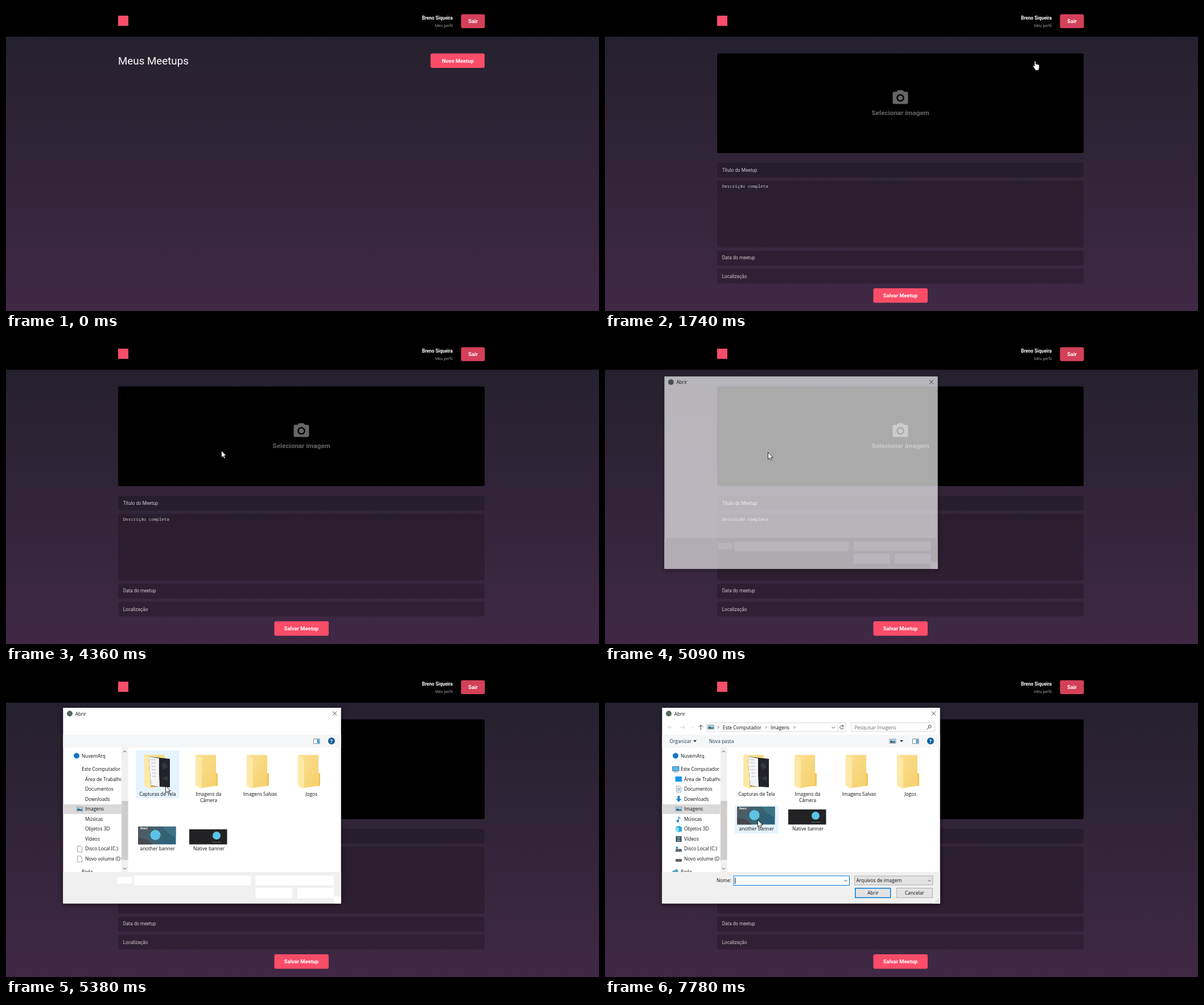
Write an HTML page that moves like this. It is 1042 by 537 pixels and loops after 8000 ms.

```html
<!DOCTYPE html>
<html lang="pt-BR">
<head>
<meta charset="utf-8">
<title>Meus Meetups</title>
<style>
html, body { margin: 0; width: 100%; height: 100%; overflow: hidden; background: #22202c; }
svg { display: block; width: 100vw; height: 100vh; }
text { font-family: Roboto, sans-serif; fill: #fff; white-space: pre; }
.b { font-weight: 700; font-size: 9.35px; }
.mid { text-anchor: middle; }
.end { text-anchor: end; }
.ph text { font-size: 8.2px; fill: #cbc6cc; }
.ph .mono { font: 7.52px "Noto Sans Mono", monospace; }
#dialog text { font-family: "Open Sans", sans-serif; font-size: 8.35px; fill: #111; }
#dialog .nav { fill: #1e395b; }
#dialog .hint { fill: #6d6d6d; }
#dialog .tiny { fill: #fff; font-size: 4.6px; font-weight: 700; }
.line { fill: none; stroke: #444; stroke-width: 1; }
.pale { stroke: #d0d0d0; }
.white { fill: #fff; }
</style>
</head>
<body>
<svg viewBox="0 0 1042 537" preserveAspectRatio="none">
  <defs>
    <linearGradient id="bg" x2="0" y2="1"><stop stop-color="#22202c"/><stop offset="1" stop-color="#402845"/></linearGradient>
    <linearGradient id="gold" x2="1" y2="1"><stop stop-color="#fbe093"/><stop offset="1" stop-color="#f5cf69"/></linearGradient>
    <linearGradient id="photo" x2="1" y2=".3"><stop stop-color="#56565c"/><stop offset=".45" stop-color="#44616d"/><stop offset="1" stop-color="#2c6279"/></linearGradient>
    <clipPath id="side"><path d="M100 133h102.5v219H100z"/></clipPath>
    <g id="folder">
      <path d="M-23-30H13V2H16V24L-12 28-23 23Z" fill="url(#gold)"/>
      <path d="M13 2H16V24L13 25Z" fill="#f2c55a"/>
      <path d="M-23-30L-12-25V30L-23 24Z" fill="#fde8a5"/>
    </g>
    <g id="picture">
      <path d="M.5.5h11v7.5H.5z" fill="#fff" stroke="#8a949c"/>
      <path d="M1.5 1.5h9v3h-9z" fill="#8cc8ee"/>
      <path d="M1.5 7V4.5L4 3.5 7 5l3.5-.5V7z" fill="#2c5a6a"/>
    </g>
    <path id="page" d="M0 0h6l2 2v8.5H0z" fill="#fff" stroke="#8c8c8c" stroke-width=".8"/>
    <path id="down" class="line" d="M-2.6-1.3L0 1.3 2.6-1.3"/>
    <path id="next" class="line" d="M-1-2L1 0-1 2"/>
  </defs>

  <rect width="1042" height="537" fill="url(#bg)"/>
  <rect width="1042" height="54"/>
  <rect x="197" y="17" width="18" height="18" fill="#f94d6a"/>
  <text class="b end" x="785" y="23.5" style="font-size:8.2px">Breno Siqueira</text>
  <text class="end" x="785" y="36.6" style="font-size:7px;fill:#999">Meu perfil</text>
  <rect x="799.5" y="14.5" width="42" height="24.5" rx="3" fill="#d44059"/>
  <text class="b mid" x="820.5" y="30.2">Sair</text>

  <g id="list">
    <text x="197" y="102.7" style="font-size:18.75px">Meus Meetups</text>
    <rect id="add" x="746" y="83.5" width="95" height="25.5" rx="3"/>
    <text class="b mid" x="794" y="99.7">Novo Meetup</text>
  </g>

  <g id="form">
    <rect x="197" y="83.5" width="644" height="175.5" rx="3"/>
    <g fill="#666" transform="translate(502.8 145.6) scale(1.35)">
      <circle cx="12" cy="12" r="3.2"/>
      <path d="M9 2L7.17 4H4c-1.1 0-2 .9-2 2v12c0 1.1.9 2 2 2h16c1.1 0 2-.9 2-2V6c0-1.1-.9-2-2-2h-3.17L15 2zm3 15c-2.76 0-5-2.24-5-5s2.24-5 5-5 5 2.24 5 5-2.24 5-5 5z"/>
    </g>
    <text class="b mid" x="519.2" y="192.2" style="font-size:11.7px;fill:#666">Selecionar imagem</text>
    <g fill-opacity=".2">
      <rect x="197" y="276" width="644" height="26" rx="3"/>
      <rect x="197" y="308" width="644" height="117" rx="3"/>
      <rect x="197" y="431" width="644" height="26" rx="3"/>
      <rect x="197" y="462.5" width="644" height="26" rx="3"/>
    </g>
    <g class="ph">
      <text x="205.7" y="292">Título do Meetup</text>
      <text x="205.7" y="320.3" class="mono">Descrição completa</text>
      <text x="205.7" y="446.4">Data do meetup</text>
      <text x="205.7" y="478.6">Localização</text>
    </g>
    <rect x="471.5" y="497" width="95.5" height="25.5" rx="3" fill="#fb4c68"/>
    <text class="b mid" x="519" y="513.1">Salvar Meetup</text>
  </g>

  <g id="dialog">
    <rect x="100.3" y="63" width="488.4" height="344.5" fill="#fff" style="filter:drop-shadow(0 2px 4px #0009)"/>
    <circle cx="112" cy="73.2" r="5" fill="#56695c"/>
    <text x="121.7" y="76.6">Abrir</text>
    <path class="line" d="M574 69.5l7 7m0-7l-7 7"/>
    <rect x="100.3" y="352" width="488.4" height="55.5" fill="#f0f0f0"/>
    <path class="white" d="M195.5 361H222v11.5h-26.5zM225 358.5h205V376H225zM438.5 358.5H576V375.5H438.5zM438.5 380H503v18.5h-64.5zM512 380h64v18.5h-64zM576 395h12.5v12.5H576z"/>

    <g id="body">
      <rect x="100.3" y="110.5" width="488.4" height="22.5" fill="#f5f6f7"/>
      <path d="M540.5 118h10.5v8h-10.5z" fill="#fff" stroke="#5c7080" stroke-width=".9"/>
      <path d="M546.5 118.5h4v7h-4z" fill="#45a5dc"/>
      <circle cx="572" cy="121.5" r="6" fill="#0f5f9c"/>
      <text class="mid" x="572" y="124.7" style="fill:#fff;font-weight:700;font-size:9px">?</text>

      <g clip-path="url(#side)">
        <path d="M100 233h103v17H100z" fill="#d9d9d9"/>
        <circle cx="124" cy="147.5" r="5" fill="#1976c5"/>
        <use href="#picture" x="123.5" y="237"/>
        <g id="labels"></g>
      </g>
      <path d="M203 133h11.5v219H203z" fill="#f0f0f0"/>
      <path d="M203 227h11.5v104H203z" fill="#cdcdcd"/>
      <use href="#down" transform="translate(208.5 140) scale(1 -1)"/>
      <use href="#down" x="208.5" y="346"/>

      <rect id="hover" x="228" width="76.5" fill="#e5f3ff"/>
      <g id="folders"></g>
      <path d="M251 149L288 153V203L255 201Z" fill="#22232b"/>
      <path d="M251 149L269 152V180L270 202 255 200Z" fill="#f4f4f4"/>
      <path class="line" d="M254 154l9 1m-8 5h8m-7 6h6m-6 6h7m-6 6h6m-6 6h7" style="stroke:#aaa;stroke-width:.8"/>
      <path d="M273 163l6-4 5 8-7 5zM275 187l9-4v9z" fill="#343640"/>
      <text class="mid" x="266.5" y="218">Capturas de Tela</text>
      <text class="mid" x="356" y="218">Imagens da</text>
      <text class="mid" x="356" y="229">Câmera</text>
      <text class="mid" x="446.5" y="218">Imagens Salvas</text>
      <text class="mid" x="536.7" y="218">Jogos</text>

      <g id="banners">
        <rect x="232" y="237" width="66.5" height="31.5" fill="url(#photo)"/>
        <path d="M275 237h23.5v20L284 248z" fill="#3d7286"/>
        <path d="M232 268.5v-12l17 4 9 8z" fill="#47474e"/>
        <circle cx="262.5" cy="252" r="9" fill="#5cc3e6"/>
        <text class="tiny" x="236" y="242.3">React</text>
        <text class="mid" x="266.2" y="279.4">another banner</text>
        <rect x="322" y="242" width="66.5" height="26.5" fill="#222224"/>
        <circle cx="370" cy="253" r="7" fill="#5cc3e6"/>
        <text class="tiny mid" x="371" y="264.6" style="font-size:2.4px;fill:#aaa">React Native</text>
        <text class="mid" x="356.5" y="279.4">Native banner</text>
      </g>
    </g>

    <g id="early">
      <use href="#page" x="125.5" y="306.5"/>
      <use href="#page" x="125.5" y="324"/>
    </g>

    <g id="full">
      <path class="line pale" d="M118.5 97.3H110.5m3.5-3.5l-3.5 3.5 3.5 3.5M132 97.3h8m-3.5-3.5l3.5 3.5-3.5 3.5M152.5 96.5l1.5 1.5 1.5-1.5"/>
      <path class="line" d="M168.3 102v-9m-3.8 3.8l3.8-3.8 3.8 3.8"/>
      <path class="line" d="M178 89.5H423V105H178zM409 89.5V105M432.5 89.5h147V105h-147z" style="stroke:#d9d9d9"/>
      <use href="#picture" x="180" y="92.7"/>
      <use href="#next" x="199" y="97.5"/>
      <text x="206.8" y="100.5">Este Computador</text>
      <use href="#next" x="283" y="97.5"/>
      <text x="291" y="100.5">Imagens</text>
      <use href="#next" x="333" y="97.5"/>
      <use href="#down" x="401.3" y="97.8"/>
      <path class="line" d="M418.6 95.6a3.2 3.2 0 1 0 .5 2.4m-.2-5v2.8h-2.8"/>
      <text class="hint" x="438.3" y="100.5">Pesquisar Imagens</text>
      <path class="line" d="M568.5 98.5l-3 3m2.6-5.5a2.5 2.5 0 1 1 5 0 2.5 2.5 0 1 1-5 0"/>
      <text class="nav" x="113.5" y="124.6">Organizar</text>
      <text class="nav" x="182.8" y="124.6">Nova pasta</text>
      <path d="M155 120h6l-3 3.5zM518 120h6l-3 3.5z" fill="#1e395b"/>
      <use href="#picture" x="499.5" y="117.5"/>

      <g clip-path="url(#side)">
        <path d="M118.5 166.5h11.5v7.5h-11.5z" fill="#59b5ea" stroke="#35789f"/>
        <path d="M121 176h7" stroke="#567"/>
        <path d="M123.5 184H135v9h-11.5z" fill="#1595ec"/>
        <use href="#page" x="125.5" y="201"/>
        <path d="M127 204.5h5m-5 2h5m-5 2h5" stroke="#3f8fca" stroke-width=".9"/>
        <path d="M127.5 218h4v5.5h3l-5 5.5-5-5.5h3z" fill="#2584d2"/>
        <path d="M129 253.5c1 2.5 4 2.5 3.5 6-.8-2-2-2.2-2.5-2.2v5a2.3 2 0 1 1-1-1.5z" fill="#1c85d4"/>
        <path d="M124 272.5l6-1.5 5 2v7.5l-5.5 1.5-5.5-2z" fill="#2fa9d8"/>
        <path d="M124 272.5l5.5 1.7V282l-5.5-2z" fill="#8adcf4"/>
        <path d="M124.5 289H134.500v10h-10z" fill="#3b3f46"/>
        <path d="M126.500 290h6v3.500h-6zM126.500 294.500h6v3.500h-6z" fill="#5b95a5"/>
        <path d="M124 313l1-1.500h9l1 1.500v3.500h-11zM124 330.500l1-1.500h9l1 1.500v3.500h-11z" fill="#60666b"/>
        <path d="M124.500 307.500h3.500v3.500h-3.500z" fill="#1c9be6"/>
        <path d="M118 351l6-3 3-1 2 5h-11z" fill="#4c9fc4"/>
      </g>

      <path d="M195 360h28v13h-28zM575 394h13v13h-13z" fill="#f0f0f0"/>
      <text class="end" x="222" y="370">Nome:</text>
      <rect x="226" y="359" width="203.500" height="16.500" fill="#fff" stroke="#0078d7"/>
      <path id="caret" d="M228.800 362v11" stroke="#000"/>
      <use href="#down" x="423" y="367.500"/>
      <g fill="#e2e2e2" stroke="#adadad">
        <rect x="438.500" y="359" width="137.500" height="16"/>
        <rect x="512.500" y="380.500" width="63" height="17"/>
        <rect x="439.700" y="380.700" width="62" height="16.600" stroke="#0078d7" stroke-width="1.500"/>
      </g>
      <text x="441.500" y="370">Arquivos de imagem</text>
      <use href="#down" x="570" y="367.500"/>
      <text class="mid" x="471" y="392">Abrir</text>
      <text class="mid" x="544" y="392">Cancelar</text>
      <path d="M586 400v6m-2.500-3.500v3.500m-2.500-1.500v1.500" stroke="#aaa" stroke-width="1.200" stroke-dasharray="1.200 1.200"/>
    </g>
  </g>

  <g id="cursor" fill="#fff" stroke="#000" stroke-width=".8" stroke-linejoin="round">
    <path id="arrow" d="M.5.5V12.800L3.300 10.200 5.200 14.400 7.200 13.500 5.400 9.400H9Z"/>
    <path id="hand" d="M3.200 9.600V1.600C3.200.1 5.600.1 5.600 1.600V6C6 5.200 7.600 5.300 7.700 6.400 8.200 5.800 9.600 6 9.700 7 10.400 6.500 11.700 7 11.700 8.200V11.500C11.700 13 10.700 14 10.700 16.800H4.800C4.600 14.500 2 12.500.7 10 .2 8.700 1.600 8 2.300 8.600Z"/>
  </g>
</svg>
<script>
const $ = id => document.getElementById(id);
const show = (id, on) => { $(id).style.display = on ? '' : 'none'; };

const places = ['Este Computador', 'Área de Trabalho', 'Documentos', 'Downloads', 'Imagens', 'Músicas',
  'Objetos 3D', 'Vídeos', 'Disco Local (C:)', 'Novo volume (D:)'];
const label = (x, y, s) => `<text x="${x}" y="${y}">${s}</text>`;
$('labels').innerHTML = label(133, 150.6, 'NuvemArq') + label(133, 355, 'Rede') +
  places.map((s, i) => label(i ? 139 : 133, 174 + i * 17.55, s)).join('');
$('folders').innerHTML = [266, 356, 446, 536].map(x => `<use href="#folder" x="${x}" y="176"/>`).join('');

// time, x, y of the pointer; equal times make a jump
const path = [
  [80, 945, 523], [300, 900, 400], [550, 790, 230], [700, 732, 160], [880, 766, 114],
  [980, 812, 96], [1030, 826, 95], [1120, 791, 100], [1400, 791, 100], [1510, 787, 91],
  [1650, 787, 91], [2000, 650, 112], [2430, 488, 151], [2480, 491, 160], [3320, 491, 160],
  [3320, 403, 189], [4360, 403, 189], [4360, 378, 196], [4460, 378, 196], [4940, 290, 198],
  [5090, 286, 199], [5190, 286, 199], [5380, 280, 200], [6290, 280, 200], [7090, 266, 257],
  [7190, 266, 259], [7240, 268, 260], [8000, 268, 260]
];

function pointer(t) {
  const i = Math.max(1, path.findIndex(p => p[0] > t));
  const [t0, x0, y0] = path[i - 1], [t1, x1, y1] = path[i];
  const k = (t - t0) / (t1 - t0);
  return [x0 + (x1 - x0) * k, y0 + (y1 - y0) * k];
}

function draw(t) {
  const [x, y] = pointer(t);
  const hand = t >= 930 && t < 4360;
  show('cursor', t >= 80);
  show('hand', hand);
  show('arrow', !hand);
  $('cursor').setAttribute('transform', `translate(${x} ${y})`);

  show('list', t < 1650);
  show('form', t >= 1650);
  $('add').setAttribute('fill', hand ? '#fb3859' : '#fb4c68');

  const open = t < 5090 ? (t - 4890) / 300 : t < 5190 ? 2 / 3 : 1;
  const size = 0.95 + 0.05 * open;
  show('dialog', open > 0);
  $('dialog').setAttribute('opacity', Math.max(0, open));
  $('dialog').setAttribute('transform', `translate(344.5 235.2) scale(${size}) translate(-344.5 -235.2)`);

  const ready = t >= 6290;
  show('body', t >= 5250);
  show('early', t >= 5250 && !ready);
  show('full', ready);
  show('caret', t < 7240 || t >= 7780);
  $('banners').setAttribute('transform', `translate(0 ${ready ? 0 : 35})`);

  const low = y > 235;
  show('hover', low || y < 222);
  $('hover').setAttribute('y', low ? 234.5 : 138);
  $('hover').setAttribute('height', low ? 49.5 : 84.5);
}

const start = performance.now();
(function tick() {
  draw((performance.now() - start) % 8000);
  requestAnimationFrame(tick);
})();
</script>
</body>
</html>
```
